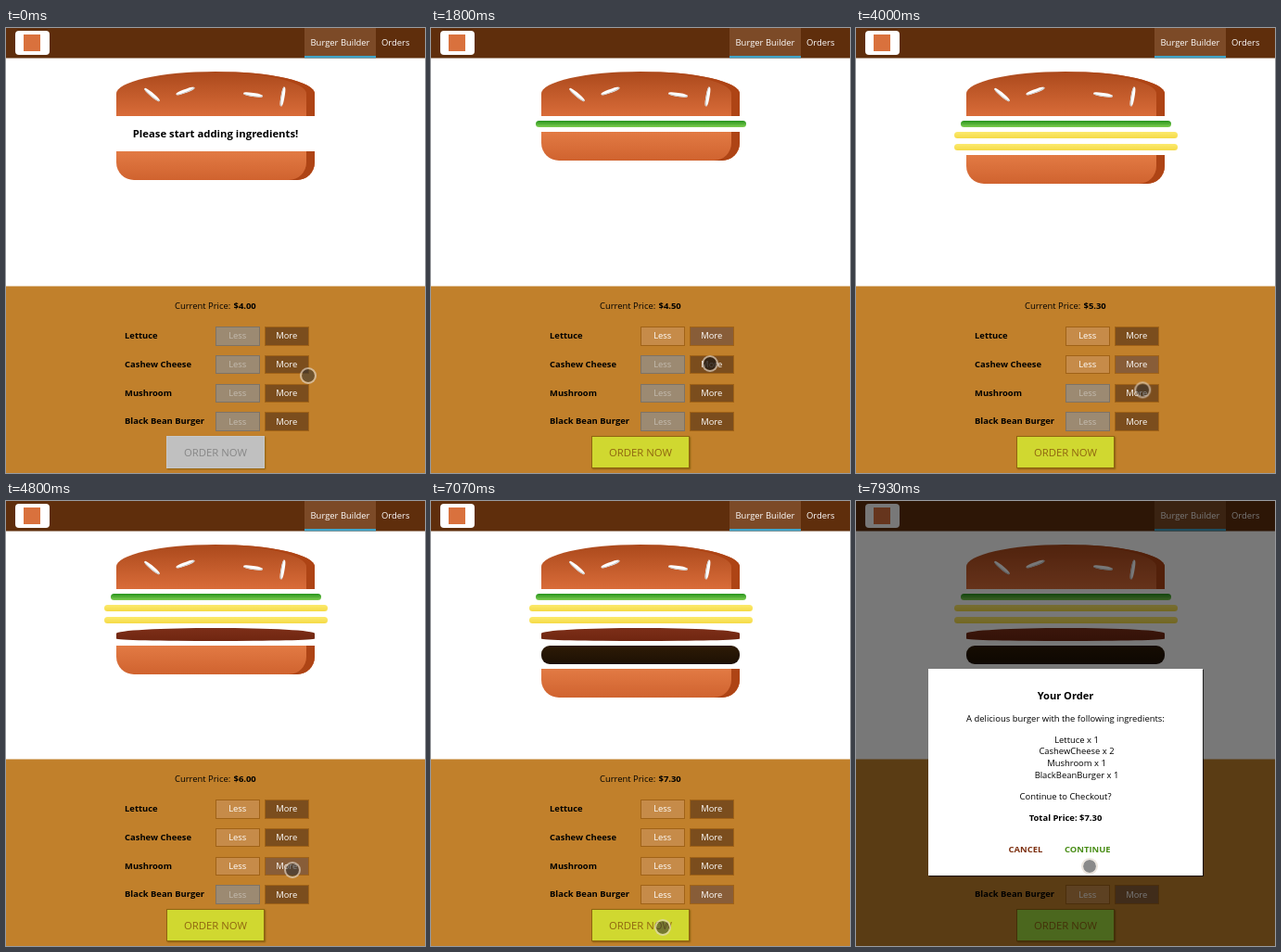
An HTML page for the animation above (8 s loop, 452x480 px).

```html
<!DOCTYPE html>
<html lang="en">
<head>
<meta charset="utf-8">
<title>Burger Builder</title>
<style>
html, body { margin: 0; width: 100%; height: 100%; overflow: hidden; }
body { position: relative; background: #fff; color: #000; font: 9.44px/14px "Open Sans", sans-serif; }
div, span.abs, i, button { position: absolute; box-sizing: border-box; white-space: nowrap; }

/* every state change runs on one 8 s clock */
.step { animation: 8s step-end infinite; }

/* toolbar */
.bar { left: 0; top: 0; width: 452px; height: 32px; background: #5f2e0c; color: #fff; box-shadow: 0 1px rgba(95,46,12,.5); }
.logo { left: 10px; top: 3px; width: 37px; height: 26px; border-radius: 4px; background: #fff; }
.logo i { left: 9px; top: 4px; width: 18px; height: 18px; background: #d9713d; }
.tab { left: 322px; top: 0; width: 77px; height: 32px; background: #7c4a27; border-bottom: 2px solid #40a4c8; box-shadow: 0 1px rgba(64,164,200,.4); }

/* burger */
.bun { left: 119px; width: 214px; box-shadow: inset -9px 0 #ae4415; }
.top { top: 47px; height: 48px; border-radius: 50% 50% 0 0; background: linear-gradient(#ab491c, #d96c39); }
.bottom { top: 133px; height: 31px; border-radius: 0 0 19px 19px; background: linear-gradient(#e27a44, #d0632f); animation-name: bottom; }
.seed { width: 21px; height: 4px; margin: -2px 0 0 -10.5px; border-radius: 40%; background: #fff; box-shadow: inset -1px -1px #c9c9c9; }
.layer { opacity: 0; }
.lettuce { left: 113px; top: 100px; width: 227px; height: 7px; border-radius: 4px; background: linear-gradient(#27941d, #7fce50); animation-name: show1; }
.cheese { left: 106px; width: 241px; height: 7px; border-radius: 4px; background: linear-gradient(#fcea6e, #f5da46); }
.c1 { top: 112px; animation-name: show2; }
.c2 { top: 125px; animation-name: show3; }
.mushroom { left: 119px; top: 137px; width: 214px; height: 14px; border-radius: 50% / 42% 42% 18% 18%; background: linear-gradient(#7d2e18, #6f2611); animation-name: show4; }
.patty { left: 119px; top: 156px; width: 214px; height: 20px; border-radius: 9px; background: linear-gradient(#2e1b06, #1d1004); animation-name: show5; }
.hint { left: 0; top: 107px; width: 452px; text-align: center; font-weight: 700; font-size: 11.33px; animation-name: hint; }

/* controls */
.panel { left: 0; top: 279px; width: 452px; height: 201px; background: #c1802b; box-shadow: 0 -1px rgba(193,128,43,.5); }
.price { left: 245.5px; top: 14px; width: 40px; height: 14px; overflow: hidden; font-weight: 700; }
.price div { animation-name: price; }
.row { left: 128px; top: calc(43px + var(--r) * 30.8px); width: 200px; height: 21px; line-height: 20px; font-weight: 700; }
button { top: 0; width: 47.5px; height: 20.5px; padding: 0; border: 1px solid #a06217; font: 9.44px/18px "Open Sans", sans-serif; color: #fff; }
.less { left: 98px; background: #9c8a72; border-color: #7e7365; color: #c4bcb0; }
.more { left: 151px; background: #7b4d1d; }
.order { left: 173px; top: 161px; width: 106px; height: 35px; font-size: 11.33px; background: #c0c0c0; border-color: #c8c8c8; color: #868686; box-shadow: 1px 1px 1.5px #8a6010; animation-name: order; }

/* summary dialog */
.shade { left: 0; top: 0; width: 452px; height: 480px; background: rgba(0,0,0,.53); opacity: 0; animation-name: shade; }
.modal { left: 78px; top: 181px; width: 296px; height: 223px; background: #fff; box-shadow: .6px .6px .6px rgba(0,0,0,.7); opacity: 0; animation: modal 8s infinite; }
.modal div { left: 0; top: calc(var(--y) * 1px - 7px); width: 296px; text-align: center; }
.modal .li { left: 12px; }
.modal .act { width: auto; font-weight: 700; }

/* pointer */
.dot { left: -9px; top: -9px; width: 18px; height: 18px; border-radius: 50%; border: 2px solid rgba(225,215,205,.65); background: rgba(50,50,50,.57); background-clip: padding-box; animation: move 8s ease-in-out infinite, press 8s step-end infinite; }

@keyframes show1 { 10.875%, to { opacity: 1; } }
@keyframes show2 { 24.125%, to { opacity: 1; } }
@keyframes show3 { 44.125%, to { opacity: 1; } }
@keyframes show4 { 55.875%, to { opacity: 1; } }
@keyframes show5 { 71.25%, to { opacity: 1; } }
@keyframes hint { 10.875%, to { opacity: 0; } }
@keyframes shade { 89.05%, to { opacity: 1; } }
@keyframes bottom {
  0% { top: 133px; } 10.875% { top: 112px; } 24.125% { top: 125px; }
  44.125% { top: 137px; } 55.875% { top: 156px; } 71.25%, to { top: 181px; }
}
@keyframes price {
  0% { transform: none; } 10.875% { transform: translateY(-14px); } 24.125% { transform: translateY(-28px); }
  44.125% { transform: translateY(-42px); } 55.875% { transform: translateY(-56px); } 71.25%, to { transform: translateY(-70px); }
}
@keyframes less1 { 10.875%, to { background: #c68b49; border-color: #a06217; color: #fff; } }
@keyframes less2 { 24.125%, to { background: #c68b49; border-color: #a06217; color: #fff; } }
@keyframes less3 { 55.875%, to { background: #c68b49; border-color: #a06217; color: #fff; } }
@keyframes less4 { 71.25%, to { background: #c68b49; border-color: #a06217; color: #fff; } }
@keyframes more1 { 10.875% { background: #885d38; } 24.125%, to { background: #7b4d1d; } }
@keyframes more2 { 24.125% { background: #885d38; } 55.875%, to { background: #7b4d1d; } }
@keyframes more3 { 55.875% { background: #885d38; } 71.25%, to { background: #7b4d1d; } }
@keyframes more4 { 71.25%, to { background: #885d38; } }
@keyframes order {
  10.875% { background: #d0d830; border-color: #8f6410; color: #8f6410; }
  89.05%, to { background: #a0db41; border-color: #8f6410; color: #8f6410; }
}
@keyframes modal {
  0%, 89.05% { opacity: 0; transform: translateY(-480px); animation-timing-function: ease-out; }
  92.8%, to { opacity: 1; transform: none; }
}
@keyframes move {
  0% { transform: translate(326px, 375px); }
  7.5%, 14% { transform: translate(306px, 337px); }
  21%, 22.5% { transform: translate(301px, 362px); }
  30%, 45% { transform: translate(310px, 365px); }
  52.5%, 60.5% { transform: translate(309px, 398px); }
  65%, 78.375% { transform: translate(312px, 431px); }
  86.25%, 92.5% { transform: translate(250px, 460px); }
  98.5%, to { transform: translate(252px, 394px); }
}
@keyframes press {
  9% { background-color: rgba(35,28,22,.8); } 10.875% { background-color: rgba(50,50,50,.57); }
  22% { background-color: rgba(35,28,22,.8); } 24.125% { background-color: rgba(50,50,50,.57); }
  42.5% { background-color: rgba(35,28,22,.8); } 44.125% { background-color: rgba(50,50,50,.57); }
  54% { background-color: rgba(35,28,22,.8); } 55.875% { background-color: rgba(50,50,50,.57); }
  69.5% { background-color: rgba(35,28,22,.8); } 71.25% { background-color: rgba(50,50,50,.57); }
  88.8% { background-color: rgba(35,28,22,.8); } 91.5%, to { background-color: rgba(50,50,50,.57); }
}
</style>
</head>
<body>
<div class="bar">
  <div class="logo"><i></i></div>
  <div class="tab"></div>
  <span class="abs" style="left:328.5px;top:8.5px">Burger Builder</span>
  <span class="abs" style="left:405px;top:8.5px">Orders</span>
</div>

<div class="bun top">
  <i class="seed" style="left:38px;top:24.5px;transform:rotate(40deg)"></i>
  <i class="seed" style="left:74.5px;top:21px;transform:rotate(-20deg)"></i>
  <i class="seed" style="left:147.5px;top:25px;transform:rotate(9deg)"></i>
  <i class="seed" style="left:179px;top:26.5px;transform:rotate(100deg)"></i>
</div>
<div class="hint step">Please start adding ingredients!</div>
<div class="layer step lettuce"></div>
<div class="layer step cheese c1"></div>
<div class="layer step cheese c2"></div>
<div class="layer step mushroom"></div>
<div class="layer step patty"></div>
<div class="bun step bottom"></div>

<div class="panel">
  <span class="abs" style="left:182px;top:14px">Current Price:</span>
  <div class="price"><div class="step">$4.00<br>$4.50<br>$4.90<br>$5.30<br>$6.00<br>$7.30</div></div>
  <div class="row" style="--r:0">Lettuce<button class="less step" style="animation-name:less1">Less</button><button class="more step" style="animation-name:more1">More</button></div>
  <div class="row" style="--r:1">Cashew Cheese<button class="less step" style="animation-name:less2">Less</button><button class="more step" style="animation-name:more2">More</button></div>
  <div class="row" style="--r:2">Mushroom<button class="less step" style="animation-name:less3">Less</button><button class="more step" style="animation-name:more3">More</button></div>
  <div class="row" style="--r:3">Black Bean Burger<button class="less step" style="animation-name:less4">Less</button><button class="more step" style="animation-name:more4">More</button></div>
  <button class="order step">ORDER NOW</button>
</div>

<div class="shade step"></div>
<div class="modal">
  <div style="--y:29;font-weight:700;font-size:11.1px">Your Order</div>
  <div style="--y:54">A delicious burger with the following ingredients:</div>
  <div class="li" style="--y:76.5">Lettuce x 1</div>
  <div class="li" style="--y:89.4">CashewCheese x 2</div>
  <div class="li" style="--y:102.3">Mushroom x 1</div>
  <div class="li" style="--y:115.2">BlackBeanBurger x 1</div>
  <div style="--y:138.3">Continue to Checkout?</div>
  <div style="--y:160.5;font-weight:700">Total Price: $7.30</div>
  <div class="act" style="--y:195;left:86.5px;color:#7d3010">CANCEL</div>
  <div class="act" style="--y:195;left:147px;color:#4a8e18">CONTINUE</div>
</div>
<div class="dot"></div>
</body>
</html>
```
